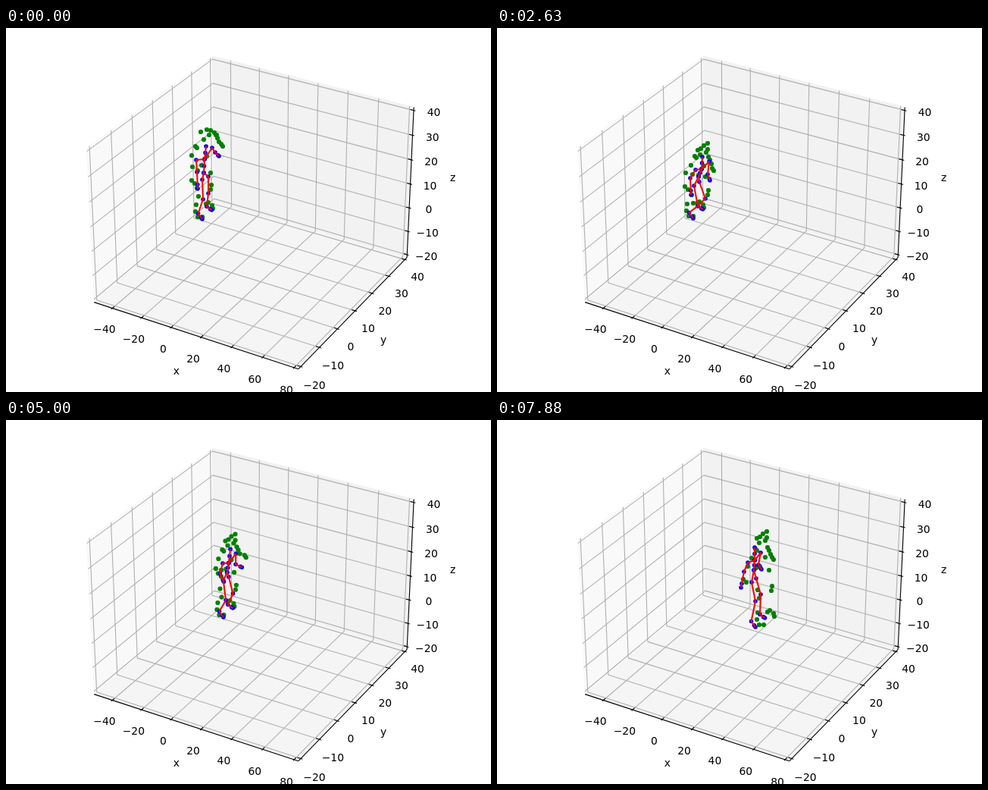
Animation, 640 px wide and 480 px high, one loop 8000 ms. Source, as an HTML page with a canvas:

```html
<!DOCTYPE html>
<html lang="en">
<head>
<meta charset="utf-8">
<title>Jumping figure in a 3D plot</title>
<style>
html, body { margin: 0; width: 100%; height: 100%; overflow: hidden; background: #fff; }
canvas { display: block; }
</style>
</head>
<body>
<canvas id="stage" width="640" height="480"></canvas>
<script>
const ctx = document.getElementById('stage').getContext('2d');
const LOOP = 8000, STEP = 125;

// ---------- axes ----------
const LO = -1 / 48, HI = 49 / 48;
const S60 = Math.sqrt(3) / 2;

// Box fractions (0..1 per axis) to pixels: azimuth -60, elevation 30, distance 10
function project([fx, fy, fz]) {
  const x = (fx - .5) * 1.14285, y = (fy - .5) * 1.14285, z = (fz - .5) * .85714;
  const right = S60 * x + .5 * y;
  const up = -.25 * x + S60 / 2 * y + S60 * z;
  const depth = S60 / 2 * x - .75 * y + .5 * z;
  const k = 480 / .185 / (10 - depth);
  return [326.49 + right * k, 233.51 - up * k];
}

function trace(points) {
  ctx.beginPath();
  points.forEach(p => ctx.lineTo(...p));
}

function line(points, color, width) {
  trace(points);
  ctx.strokeStyle = color;
  ctx.lineWidth = width;
  ctx.stroke();
}

function pane(corners, color) {
  trace(corners.map(project));
  ctx.closePath();
  ctx.fillStyle = ctx.strokeStyle = color;
  ctx.lineWidth = 1;
  ctx.fill();
  ctx.stroke();
}

const AXES = [
  { name: 'x', min: -50, max: 80, first: -40, step: 20, out: [0, -1, -1], tick: 1,
    at: f => [f, LO, LO], grid: f => [[f, LO, LO], [f, HI, LO], [f, HI, HI]] },
  { name: 'y', min: -20, max: 40, first: -20, step: 10, out: [1, 0, -1], tick: 0,
    at: f => [HI, f, LO], grid: f => [[HI, f, LO], [LO, f, LO], [LO, f, HI]] },
  { name: 'z', min: -20, max: 40, first: -20, step: 10, out: [1, 1, 0], tick: 0,
    at: f => [HI, HI, f], grid: f => [[LO, LO, f], [LO, HI, f], [HI, HI, f]] }
];

function drawAxes() {
  ctx.fillStyle = '#fff';
  ctx.fillRect(0, 0, 640, 480);
  pane([[LO, LO, LO], [LO, HI, LO], [LO, HI, HI], [LO, LO, HI]], '#f9f9f9');
  pane([[LO, HI, LO], [HI, HI, LO], [HI, HI, HI], [LO, HI, HI]], '#f2f2f2');
  pane([[LO, LO, LO], [HI, LO, LO], [HI, HI, LO], [LO, HI, LO]], '#f5f5f5');

  const ticks = axis => {
    const list = [];
    for (let v = axis.first; v <= axis.max; v += axis.step)
      list.push([v, (v - axis.min) / (axis.max - axis.min)]);
    return list;
  };
  for (const axis of AXES)
    for (const [, f] of ticks(axis)) line(axis.grid(f).map(project), '#b0b0b0', 1.11);

  ctx.font = '13.89px "DejaVu Sans", sans-serif';
  ctx.textAlign = 'center';
  for (const axis of AXES) {
    const shifted = (f, d) => axis.at(f).map((c, i) => c + axis.out[i] * d);
    const write = (text, f, d, drop) => {
      const [x, y] = project(shifted(f, d));
      ctx.fillStyle = '#000';
      ctx.fillText(text, x, y + drop);
    };
    line([axis.at(LO), axis.at(HI)].map(project), '#000', 1.11);
    for (const [v, f] of ticks(axis)) {
      const end = d => {
        const p = axis.at(f);
        p[axis.tick] += axis.out[axis.tick] * d;
        return project(p);
      };
      line([end(.0085), end(-.017)], '#000', 1.11);
      write(String(v).replace('-', '\u2212'), f, .0666, 10.6);
    }
    write(axis.name, .5, .1447, 3.8);
  }
}

// ---------- figure ----------
const JOINTS = ['head', 'chest', 'pelvis', 'hipL', 'kneeL', 'hipR', 'kneeR', 'shoulderL',
  'elbowL', 'handL', 'shoulderR', 'elbowR', 'handR', 'crown'];

// Joint offsets from the right toe, in the order of JOINTS
const POSES = {
  rest: [5,-96, 3,-79, 2,-61, 8,-56, 8,-34, 0,-52, 1,-26, 13,-94, 17,-88, 22,-83, -8,-78, -7,-62, -6,-40, 10,-117],
  reach: [7,-96, 4,-76, 3,-62, 6,-57, 10,-35, -1,-52, 1,-27, 13,-90, 14,-78, 26,-77, -4,-76, -5,-60, 3,-58, 13,-117],
  crouch: [12,-81, 11,-65, 7,-55, 8,-48, 16,-26, 1,-43, 6,-16, 21,-75, 19,-58, 22,-50, 3,-64, -4,-53, -3,-31, 19,-99],
  fly: [2,-98, 1,-82, -1,-66, 4,-58, 10,-36, -4,-55, 1,-29, 10,-95, 16,-90, 24,-88, -8,-80, -6,-84, 2,-86, 10,-121],
  stand: [-3,-95, -3,-80, -3,-68, 2,-57, 8,-36, -5,-60, -1,-29, 5,-90, 6,-78, 15,-64, -11,-75, -14,-59, -5,-43, 6,-117],
  swing: [-2,-101, -2,-87, -4,-77, -1,-62, 7,-41, -8,-57, -3,-32, 8,-96, 2,-83, 6,-77, -12,-83, -18,-71, -24,-51, 11,-122],
  dip: [7,-89, 3,-72, 2,-62, 5,-50, 12,-35, -3,-51, 3,-26, 15,-86, 15,-73, 27,-72, -2,-70, -4,-52, 6,-52, 21,-106],
  tall: [-1,-105, -1,-88, -2,-75, 1,-64, 7,-43, -5,-59, 0,-34, 7,-98, 4,-82, 8,-76, -10,-85, -15,-73, -19,-52, 15,-126]
};

// time, pose, toe x, toe y, drift of the markers to the right
const KEYS = [
  [0, 'rest', 259, 252, 0], [500, 'rest', 259, 252, 0], [1625, 'reach', 259, 252, 0],
  [2000, 'reach', 259, 252, 0], [2625, 'crouch', 259, 251, 0], [2875, 'crouch', 259, 251, 0],
  [3125, 'fly', 274, 243, 0], [3375, 'dip', 287, 260, 0], [3875, 'stand', 287, 260, 0],
  [4300, 'reach', 287, 260, 0], [4800, 'reach', 287, 260, 0], [5250, 'crouch', 287, 260, 1],
  [5375, 'crouch', 288, 260, 2], [5625, 'fly', 301, 256, 5], [5875, 'swing', 315, 273, 8],
  [6200, 'swing', 315, 273, 8], [6875, 'dip', 316, 272, 7], [7200, 'crouch', 316, 272, 7],
  [7420, 'fly', 328, 258, 9], [7625, 'reach', 340, 272, 10], [7875, 'tall', 341, 273, 11],
  [LOOP, 'tall', 341, 273, 11]
].map(([time, pose, ...foot]) =>
  ({ time, values: [...POSES[pose], ...foot, pose === 'rest' ? 1 : 0] }));

// Marker offsets by joint; a second pair applies while the head is turned
const MARKERS = {
  crown: [[0, 0, 1, 0], [-5, 3, -4, -1], [-9, 7, -1, 6], [-13, 9, -12, 2],
    [0, 8, 6, 3], [-10, 15, -8, 12], [-2, 12, 9, 6]],
  shoulderR: [[-1, -18], [1, -16], [-6, -6]],
  elbowL: [[3, -19], [5, -14], [1, -23]],
  elbowR: [[-6, -7]],
  handL: [[3, -16], [5, -13]],
  handR: [[-8, -11], [-4, -7]],
  chest: [[3, -4], [-4, 8]],
  pelvis: [[9, 0], [-8, -3]],
  kneeL: [[4, -11], [3, -5]],
  kneeR: [[-6, -4], [-8, -15]],
  toeR: [[0, -3], [-6, -3], [-9, -10], [-8, -19], [8, -22], [13, -18], [14, -14], [5, -20]]
};

const BONES = [
  ['head', 'neck', 'chest', 'spine', 'pelvis'],
  ['chest', 'shoulderL', 'elbowL', 'wristL', 'handL'],
  ['chest', 'shoulderR', 'elbowR', 'wristR', 'handR'],
  ['pelvis', 'hipL', 'kneeL', 'ankleL', 'ballL', 'toeL'],
  ['pelvis', 'hipR', 'kneeR', 'ankleR', 'ballR', 'toeR']
];

function stateAt(time) {
  const i = KEYS.findIndex(k => k.time > time);
  const a = KEYS[i - 1], b = KEYS[i];
  const u = (time - a.time) / (b.time - a.time), e = u * u * (3 - 2 * u);
  return a.values.map((v, n) => v + (b.values[n] - v) * e);
}

function bodyAt(time) {
  const s = stateAt(time);
  const [x, y, drift, turn] = s.slice(-4);
  const body = {};
  JOINTS.forEach((name, i) => body[name] = [x + s[2 * i], y + s[2 * i + 1]]);
  body.toeR = [x, y];
  body.ankleR = [x - 5.5, y - 7.5];
  body.toeL = [x + 12.5, y - 12];
  body.ankleL = [x + 6, y - 16.5];
  const between = (a, b, u) => body[a].map((v, i) => v + (body[b][i] - v) * u);
  body.neck = between('head', 'chest', .5);
  body.spine = between('chest', 'pelvis', .5);
  for (const side of 'LR') {
    body['wrist' + side] = between('elbow' + side, 'hand' + side, .75);
    body['ball' + side] = between('ankle' + side, 'toe' + side, .7);
  }
  return { body, drift, turn };
}

function dot([x, y], r, color) {
  ctx.beginPath();
  ctx.arc(x, y, r, 0, 2 * Math.PI);
  ctx.fillStyle = color;
  ctx.fill();
}

function drawFigure(time) {
  const { body, drift, turn } = bodyAt(time);
  for (const [joint, offsets] of Object.entries(MARKERS)) {
    const [x, y] = body[joint], shift = joint === 'crown' ? 0 : drift;
    for (const [dx, dy, tx = dx, ty = dy] of offsets)
      dot([x + shift + dx + (tx - dx) * turn, y + dy + (ty - dy) * turn], 3.1, '#008000');
  }
  for (const chain of BONES)
    for (const joint of chain) dot(body[joint], 2.8, '#00f');
  ctx.lineJoin = 'round';
  for (const chain of BONES) line(chain.map(j => body[j]), '#f00', 2.08);
}

function frame() {
  const time = performance.now() % LOOP;
  drawAxes();
  drawFigure(Math.floor(time / STEP) * STEP);
  requestAnimationFrame(frame);
}
frame();
</script>
</body>
</html>
```
